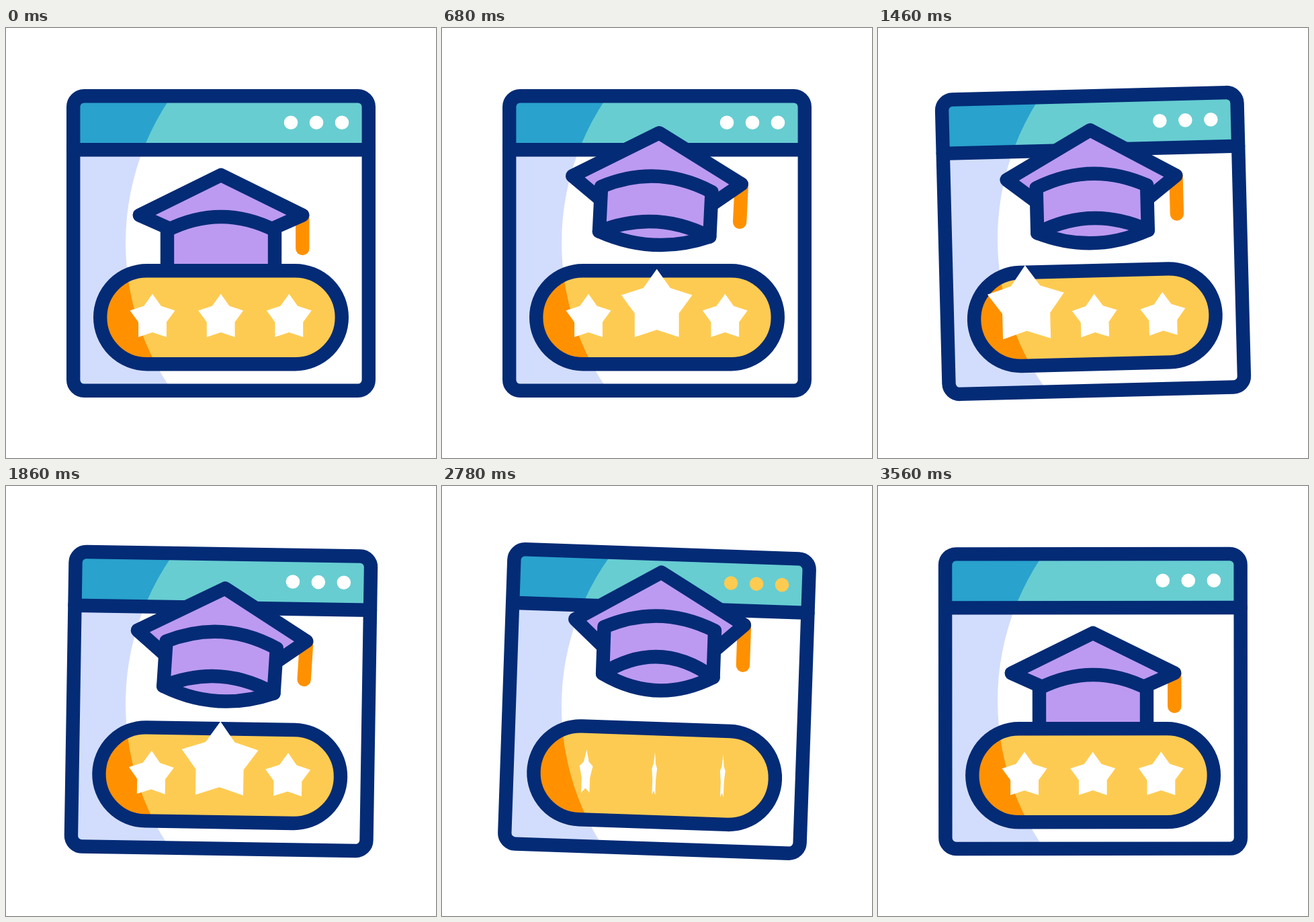
These frames come from a looping animation (640 px wide and 640 px high, 3600 ms). An HTML page with a canvas:

```html
<!DOCTYPE html>
<html lang="en">
<head>
<meta charset="utf-8">
<title>Online degree</title>
<style>
  html, body { margin: 0; width: 100%; height: 100%; overflow: hidden; background: #fff; }
  canvas { display: block; width: 100vw; height: 100vh; }
</style>
</head>
<body>
<canvas id="stage" width="640" height="640"></canvas>
<script>
const ctx = document.getElementById('stage').getContext('2d');
const LOOP = 3600, CYCLE = 1200, BEAT = 400, MID = 320;
const NAVY = '#042b76', PURPLE = '#bc9af1', ORANGE = '#ff9100', LINE = 20.4;
const STAR_X = [218, 319.7, 421.3], STAR_BASE = 460;
// Right half of a star, measured from the middle of its base.
const STAR_HALF = [[0, -64.3], [12.8, -46.3], [33.5, -39.6], [20.9, -22.3], [20.9, 0], [0, -6.9]];

const clamp = v => Math.min(1, Math.max(0, v));
const ease = p => (1 - Math.cos(Math.PI * clamp(p))) / 2;
const bump = p => p <= 0 || p >= 1 ? 0 : Math.sin(Math.PI * p) ** 2;
const lerp = (a, b, p) => a + (b - a) * p;

function spin(degrees, x, y) {
  ctx.translate(x, y);
  ctx.rotate(degrees * Math.PI / 180);
  ctx.translate(-x, -y);
}

function paint(fill, stroke) {
  if (fill) { ctx.fillStyle = fill; ctx.fill(); }
  if (stroke) { ctx.strokeStyle = stroke; ctx.stroke(); }
}

function polyline(points) {
  ctx.beginPath();
  points.forEach(([x, y]) => ctx.lineTo(x, y));
}

function roundBox(x, y, w, h, r) {
  ctx.beginPath();
  ctx.roundRect(x, y, w, h, r);
}

// Fills a band of the clipped area, darker outside the big shading circle.
function shade(x, y, w, h, dark, light) {
  ctx.save();
  ctx.beginPath();
  ctx.rect(x, y, w, h);
  ctx.clip();
  paint(dark);
  ctx.beginPath();
  ctx.arc(561.5, 320, 383.5, 0, Math.PI * 2);
  paint(light);
  ctx.restore();
}

function windowTilt(t) {
  const keys = [0, -2, 2, -2, 2, -2, 0];
  const s = (t - CYCLE) / BEAT;
  if (s <= 0) return 0;
  const i = Math.min(5, Math.floor(s));
  return lerp(keys[i], keys[i + 1], ease(s - i));
}

function drawWindow(t) {
  ctx.save();
  roundBox(100.2, 101.2, 439.6, 438.6, 16);
  ctx.clip();
  shade(100, 100, 440, 81, '#29a2cd', '#67cdd1');
  shade(100, 181, 440, 360, '#d2ddfd', '#fff');
  ctx.restore();
  roundBox(100.2, 101.2, 439.6, 438.6, 16);
  paint(null, NAVY);
  polyline([[100.2, 181.2], [539.8, 181.2]]);
  paint(null, NAVY);

  const glow = bump((t - 2 * CYCLE) / (2 * BEAT));
  const dotColor = `rgb(${lerp(255, 254, glow)},${lerp(255, 203, glow)},${lerp(255, 80, glow)})`;
  for (const x of [424, 462, 500]) {
    ctx.beginPath();
    ctx.arc(x, 140.8, 10.3, 0, Math.PI * 2);
    paint(dotColor);
  }
}

function drawCap(t) {
  const phase = t % CYCLE;
  const fall = clamp((phase - BEAT) / 500);
  const lift = phase < BEAT ? ease(phase / BEAT) : 1 - fall * fall;
  const wide = ease(t / BEAT) * (1 - ease((t - 2800) / 500));

  const brim = lerp(121.3, 126, wide), half = lerp(80, 82.3, wide);
  const left = MID - half, right = MID + half;
  const tipY = 278.6 - 76.5 * lift;
  const apexY = lerp(218.8, 217, wide) - 89 * lift;
  const cornerY = 301 - 89 * lift, archY = 281 - 88 * lift;
  const hemY = 361.5 - 80 * lift;
  const rimTop = 363.5 - 110 * lift, rimBottom = 364 - 60 * lift;
  const flapY = 297 - 55 * lift;
  const curve = (x, endY, midY) => ctx.quadraticCurveTo(MID, 2 * midY - endY, x, endY);

  ctx.save();
  spin(2.8 * Math.sin(Math.PI * fall), MID, tipY);

  polyline([[MID + brim, tipY], [MID + brim, 328 - 66 * lift]]);
  paint(null, ORANGE);

  polyline([[left, flapY], [MID - brim, tipY], [MID, apexY], [MID + brim, tipY], [right, flapY]]);
  paint(PURPLE, NAVY);

  ctx.beginPath();
  ctx.moveTo(left, cornerY);
  curve(right, cornerY, archY);
  ctx.lineTo(right, hemY);
  curve(left, hemY, rimBottom);
  ctx.closePath();
  paint(PURPLE, NAVY);

  ctx.beginPath();
  ctx.moveTo(left, hemY);
  curve(right, hemY, rimTop);
  paint(null, NAVY);
  ctx.restore();
}

function drawPill() {
  ctx.save();
  roundBox(140.2, 361.2, 359.6, 139, 69.5);
  ctx.clip();
  shade(130, 351, 380, 160, ORANGE, '#fecb52');
  ctx.restore();
  roundBox(140.2, 361.2, 359.6, 139, 69.5);
  paint(null, NAVY);
}

function drawStar(i, t) {
  const pop = t < 2 * CYCLE ? bump((t % CYCLE - i * BEAT) / BEAT) : 0;
  const flipStart = 2 * CYCLE + (i === 0 ? 30 : 0);
  const flip = Math.abs(Math.cos(Math.PI * ease((t - flipStart) / (2 * BEAT))));
  const size = 1 + 0.89 * pop;
  const mirrored = STAR_HALF.slice(1, -1).reverse().map(([x, y]) => [-x, y]);

  ctx.save();
  ctx.translate(STAR_X[i], STAR_BASE);
  ctx.scale(size * flip, size);
  polyline([...STAR_HALF, ...mirrored]);
  paint('#fff');
  ctx.restore();
}

function draw(t) {
  ctx.fillStyle = '#fff';
  ctx.fillRect(0, 0, 640, 640);
  ctx.save();
  ctx.lineWidth = LINE;
  ctx.lineCap = ctx.lineJoin = 'round';
  spin(windowTilt(t), MID, MID);
  drawWindow(t);
  drawCap(t);
  drawPill();
  STAR_X.forEach((_, i) => drawStar(i, t));
  ctx.restore();
}

const start = performance.now();
function tick() {
  draw((performance.now() - start) % LOOP);
  requestAnimationFrame(tick);
}
tick();
</script>
</body>
</html>
```
